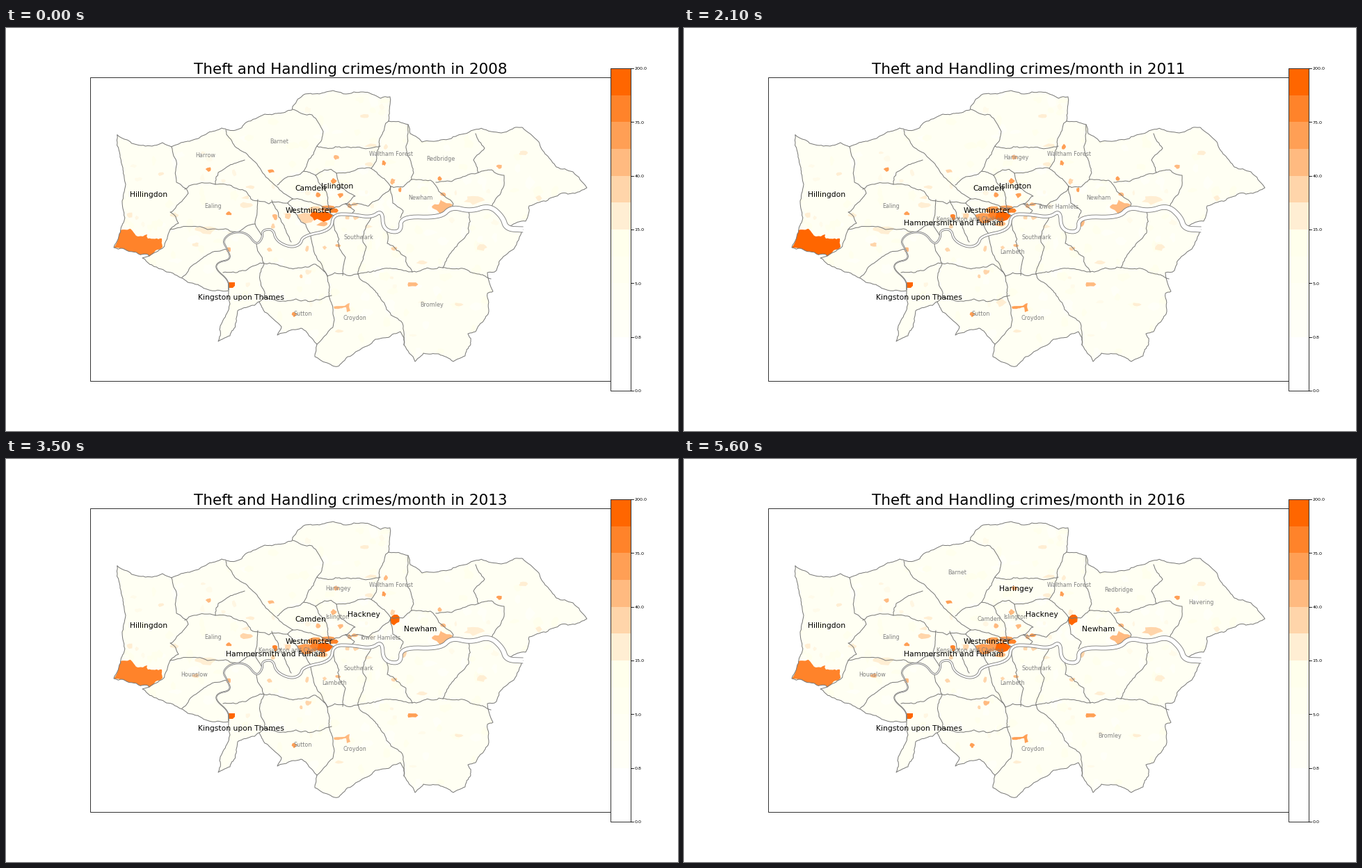
A matplotlib script for the animation above (6300 ms loop, 966 by 580 pixels).

```python
import numpy as np
import matplotlib.pyplot as plt
from matplotlib.animation import FuncAnimation
from matplotlib.collections import PolyCollection
from matplotlib.patches import Polygon, Rectangle

W, H, DPI = 966, 580, 100
PX = 72 / DPI
FIRST, N = 2008, 9
RAMP = ["#ffffff", "#ffffff", "#fffff7", "#fffff4", "#fffff0", "#ffffec",
        "#ffeed3", "#ffd5aa", "#ffba80", "#ff9f55", "#ff832a", "#ff6600"]
GREY = "#787878"

plt.rcParams["font.family"] = "DejaVu Sans"
rng = np.random.default_rng(12)
fig = plt.figure(figsize=(W / DPI, H / DPI), dpi=DPI, facecolor="white")
ax = fig.add_axes([0, 0, 1, 1])
ax.set_xlim(0, W)
ax.set_ylim(H, 0)
ax.axis("off")


def points(*nums):
    return np.array(nums, float).reshape(-1, 2)


def split(a, b, k):
    """Midpoint displacement from a to b, without a itself."""
    d = b - a
    if np.hypot(*d) < 4:
        return [b]
    m = (a + b) / 2 + np.array([-d[1], d[0]]) * rng.normal(0, k)
    return split(a, m, k) + split(m, b, k)


def rough(pts, k=0.07):
    out = [pts[0]]
    for a, b in zip(pts[:-1], pts[1:]):
        out += split(a, b, k)
    return np.array(out)


def smooth(pts, rounds=3):
    for _ in range(rounds):
        a, b = pts[:-1], pts[1:]
        mid = np.stack([0.75 * a + 0.25 * b, 0.25 * a + 0.75 * b], 1)
        pts = np.vstack([pts[:1], mid.reshape(-1, 2), pts[-1:]])
    return pts


def blob(x, y, w, h):
    n = int(rng.integers(7, 12))
    ang = np.linspace(0, 2 * np.pi, n, endpoint=False)
    r = rng.uniform(0.6, 1.2, n) / 2
    return np.c_[x + w * r * np.cos(ang), y + h * r * np.sin(ang)]


def stroke(pts, z=4, width=1.0):
    ax.plot(pts[:, 0], pts[:, 1], color=GREY, lw=width * PX, zorder=z)


def border(*nums):
    stroke(rough(points(*nums)))


# Outer edge, clockwise from the north-west corner
north = points(
    160, 154, 188, 168, 213, 169, 225, 165, 238, 171, 272, 160, 310, 144,
    330, 147, 345, 136, 372, 124, 411, 118, 412, 113, 430, 95, 470, 90,
    500, 92, 552, 99, 550, 134, 578, 139, 581, 152, 598, 164, 625, 161,
    655, 153, 712, 151, 742, 143, 766, 164, 791, 200, 815, 207, 835, 230,
    798, 238, 752, 256, 747, 278, 724, 285, 743, 290)
south = points(
    737, 305, 718, 327, 705, 349, 692, 352, 700, 379, 692, 382, 694, 408,
    675, 437, 664, 440, 668, 455, 643, 480, 622, 469, 600, 468, 588, 480,
    572, 456, 567, 437, 531, 448, 505, 465, 477, 487, 444, 473, 447, 455,
    424, 432, 390, 442, 396, 430, 372, 409, 364, 394, 333, 407, 322, 443,
    305, 451, 307, 434, 322, 397, 320, 378, 289, 376, 253, 360, 196, 331,
    206, 328, 155, 316, 169, 280, 172, 225, 164, 183, 160, 154)
edge = rough(np.vstack([north, south]), 0.06)
land = ax.add_patch(Polygon(edge, fc="#fffff3", ec="none", zorder=1))
stroke(edge)

# Faint variation between small areas
for tint, count, size in [("#fffff8", 90, 16), ("#ffffed", 150, 14),
                          ("#fffbea", 35, 9), ("#fff6e2", 20, 7)]:
    for _ in range(count):
        x, y = rng.uniform(155, 835), rng.uniform(90, 485)
        w, h = size * rng.uniform(0.5, 1.3, 2)
        p = ax.add_patch(Polygon(blob(x, y, w, h), fc=tint, zorder=2))
        p.set_clip_path(land)

# Borough borders, north of the river
border(238, 171, 245, 222, 262, 238, 236, 265, 248, 281, 236, 290, 225, 317,
       206, 328)
border(257, 232, 270, 225, 301, 225, 305, 208, 343, 190)
border(316, 147, 347, 182, 367, 205, 412, 246)
border(301, 225, 345, 235, 352, 246, 405, 252, 412, 246)
border(236, 290, 275, 286, 305, 290, 358, 282)
border(362, 247, 358, 282, 367, 298)
border(382, 248, 392, 272, 410, 308)
border(405, 252, 420, 273, 437, 295)
border(412, 117, 440, 125, 456, 149, 447, 170, 434, 192, 428, 206)
border(447, 170, 490, 171, 538, 170)
border(390, 226, 405, 214, 428, 206, 445, 212, 458, 204, 475, 209, 525, 202)
border(550, 134, 536, 172, 525, 202, 553, 228)
border(578, 139, 575, 170, 585, 205, 583, 218)
border(553, 228, 583, 218, 610, 219, 622, 235, 643, 253, 640, 260)
border(675, 152, 688, 173, 672, 190, 679, 208, 640, 221, 618, 222)
border(679, 208, 716, 212, 710, 240, 697, 262)
border(412, 246, 438, 250, 470, 260, 488, 253, 501, 263, 497, 269)
border(445, 212, 460, 235, 471, 270)
border(475, 209, 482, 230, 502, 242, 488, 253)
border(488, 253, 548, 236, 553, 228, 556, 252, 571, 263, 567, 273)

# Borough borders, south of the river
border(318, 319, 290, 326, 270, 340, 253, 359)
border(360, 309, 370, 338, 365, 355, 372, 386, 364, 394)
border(312, 352, 335, 350, 370, 338, 405, 345, 445, 340, 462, 357)
border(437, 296, 440, 310, 462, 357, 506, 354)
border(471, 277, 488, 330, 484, 356)
border(525, 272, 513, 300, 518, 315, 506, 354)
border(545, 286, 548, 310, 575, 330, 584, 351)
border(665, 262, 665, 295, 633, 335, 628, 345)
border(506, 354, 584, 351, 628, 345, 697, 361)
border(372, 387, 432, 392, 468, 385)
border(462, 357, 472, 420, 447, 455)
border(506, 354, 535, 385, 570, 425, 572, 456)

# River, widening downstream
flow = smooth(points(
    320, 377, 320, 363, 301, 347, 304, 337, 324, 333, 318, 318, 311, 306,
    324, 294, 346, 294, 360, 313, 369, 302, 368, 291, 384, 289, 388, 306,
    408, 316, 423, 312, 427, 299, 468, 291, 470, 268, 497, 268, 525, 273,
    541, 262, 542, 291, 568, 295, 567, 271, 625, 273, 640, 257, 668, 264,
    695, 255, 714, 272, 719, 289, 743, 290))
run = np.gradient(flow, axis=0)
run /= np.hypot(run[:, 0], run[:, 1])[:, None]
half = np.linspace(0.6, 2, len(flow)) ** 2
side = np.c_[-run[:, 1], run[:, 0]] * half[:, None]
banks = flow + side, flow - side
ax.add_patch(Polygon(np.vstack([banks[0], banks[1][::-1]]), fc="white",
                     ec="none", zorder=5))
for bank in banks:
    stroke(bank, 5, 0.85)

# Hot areas: one level per year, 0 = none, 6 = most
shapes, levels = [], []


def area(shape, by_year):
    shapes.append(shape)
    levels.append(by_year)


def trend(a, b):
    return np.linspace(a, b, N).round().astype(int)


airport = rough(points(163, 292, 179, 289, 190, 300, 203, 297, 204, 303,
                       224, 303, 225, 315, 207, 328, 155, 316, 163, 292))
docks = rough(points(612, 257, 622, 254, 625, 247, 642, 254, 634, 264,
                     627, 270, 619, 262, 612, 257))
area(airport, [5, 6, 5, 6, 6, 5, 6, 5, 5])
area(docks, [3] * 6 + [4] + [3] * 2)

# City centre
area(blob(431, 273, 24, 16), [2] + [4] * 8)
area(blob(442, 261, 20, 10), [2] + [4] * 8)
area(blob(456, 282, 18, 9), trend(3, 3))
area(blob(462, 259, 22, 9), trend(4, 4))
area(blob(446, 270, 18, 14), trend(6, 4))
area(blob(459, 270, 22, 18), trend(6, 6))
area(blob(471, 263, 12, 8), trend(5, 5))

# Town centres
area(points(319, 366, 329, 366, 329, 371, 326, 374, 320, 374), trend(6, 6))
area(blob(559, 231, 17, 15), [0] * 4 + [6] * 5)
area(blob(566, 233, 5, 8), [4] * 4 + [0] * 5)
area(blob(572, 280, 11, 17), [0] + [3] * 4 + [2] * 4)
area(blob(526, 169, 21, 6), [1] * 6 + [4] + [1] * 2)
area(blob(387, 272, 9, 9), [3] + [5] * 8)
area(rough(points(471, 401, 484, 400, 494, 396, 495, 407, 490, 409, 489, 402,
                  472, 404, 471, 401)), [3] + [4] * 4 + [3, 2, 4, 4])
area(blob(584, 369, 15, 8), trend(3, 4))
area(blob(346, 255, 18, 9), trend(1, 2))
area(blob(381, 206, 12, 5), [4, 4, 3, 2, 2, 3, 3, 4, 4])
area(blob(546, 171, 7, 8), [1] * 3 + [4] * 2 + [3] * 2 + [1] * 2)
area(blob(456, 395, 18, 13), [0] * 3 + [1] * 2 + [0] * 4)

centres = {
    (4, 3): [(291, 203), (623, 217), (449, 240), (481, 241), (471, 220)],
    (4, 4): [(320, 267), (543, 194), (414, 412)],
    (3, 3): [(320, 319), (494, 256), (629, 239), (475, 186), (477, 313)],
    (3, 4): [(709, 199)],
    (2, 4): [(501, 254)],
    (1, 3): [(273, 312), (435, 351)],
    (3, 1): [(556, 221)],
    (2, 2): [(384, 285), (405, 270), (458, 316), (433, 318), (379, 319),
             (557, 317), (490, 273), (503, 273), (424, 357)],
}
for (a, b), places in centres.items():
    for x, y in places:
        area(blob(x, y, *rng.uniform(6, 10, 2)), trend(a, b))

# Wider, mild areas
area(blob(288, 291, 34, 11), trend(1, 1))
area(blob(673, 248, 27, 13), [1] * 8 + [2])
for x, y in [(222, 210), (178, 269), (241, 269), (352, 229), (345, 244),
             (516, 127), (744, 180), (766, 245), (684, 316), (598, 337),
             (650, 398), (479, 436), (523, 196), (521, 286)]:
    area(blob(x, y, rng.uniform(9, 16), rng.uniform(5, 9)), trend(1, 1))

cells = PolyCollection(shapes, edgecolors="none", zorder=3)
ax.add_collection(cells)
cells.set_clip_path(land)

# Plot frame and colour scale
x0, x1, top, bottom = 0.9 * W, 0.93 * W, 0.1 * H, 0.9 * H
ax.add_patch(Rectangle((0.125 * W, 71), 0.775 * W, 437, fill=False,
                       ec="#333333", lw=PX, zorder=6))
band = (bottom - top) / len(RAMP)
for i, c in enumerate(RAMP):
    ax.add_patch(Rectangle((x0, bottom - (i + 1) * band), x1 - x0, band, fc=c,
                           ec="none", antialiased=False, zorder=6))
ax.add_patch(Rectangle((x0, top), x1 - x0, bottom - top, fill=False,
                       ec="#333333", lw=PX, zorder=7))


def text(x, y, s, size, color="black", ha="center", z=8):
    """Text of a size in pixels, its capitals centred on y."""
    return ax.text(x, y + 0.365 * size, s, fontsize=size * PX, color=color,
                   ha=ha, va="baseline", zorder=z)


for i, s in enumerate(["0.0", "0.8", "5.0", "15.0", "40.0", "75.0", "200.0"]):
    y = bottom - 2 * band * i
    ax.plot([x1, x1 + 3.7], [y, y], color="black", lw=0.6, zorder=7)
    text(903.6, y, s, 6.44, ha="left")

title = text(495.07, 58, "", 21.47)

# Names: s = small grey, B = large black, one letter per year
labels = []


def label(name, x, y, code):
    small = text(x, y, name, 8.05, "#808080")
    large = text(x, y, name, 10.73, z=9)
    labels.append((small, large, code))


label("Hillingdon", 205, 239, "BBBBBBBBB")
label("Westminster", 435.5, 262, "BBBBBBBBB")
label("Kingston upon Thames", 338, 387, "BBBBBBBBB")
label("Camden", 438, 230, "BBBBBBsss")
label("Islington", 476, 227.5, "BBBBsssss")
label("Hammersmith and Fulham", 388, 280.5, ".BBBBBBBB")
label("Hackney", 514, 223, "....BBBBB")
label("Newham", 595.5, 244.5, "ssssBBBBB")
label("Haringey", 477, 186.5, ".sssssssB")
label("Barnet", 392.5, 163, "ss.....ss")
label("Harrow", 287, 183, "s........")
label("Waltham Forest", 553, 181.5, "ssssss.ss")
label("Redbridge", 624.5, 188, "ss......s")
label("Ealing", 297.5, 256.5, "sssssssss")
label("Southwark", 507, 301.5, "ssssss..s")
label("Bromley", 612.5, 398, "s.....sss")
label("Sutton", 427, 411.5, "sssssss..")
label("Croydon", 501, 417, "ssssss.ss")
label("Tower Hamlets", 537.5, 257, ".sssss...")
label("Kensington and Chelsea", 411, 275, "..sssssss")
label("Lambeth", 472, 322, "..sssssss")
label("Barking and Dagenham", 673, 227, "....s....")
label("Hounslow", 270.5, 310, "....sssss")
label("Greenwich", 613, 299.5, "....s....")
label("Enfield", 491, 127, "......s..")
label("Havering", 743, 206, "........s")


def draw(i):
    title.set_text(f"Theft and Handling crimes/month in {FIRST + i}")
    cells.set_facecolor([RAMP[5 + v[i]] if v[i] else "none" for v in levels])
    for small, large, code in labels:
        small.set_visible(code[i] == "s")
        large.set_visible(code[i] == "B")
    return [title, cells]


anim = FuncAnimation(fig, draw, frames=N, interval=700, repeat=True)
plt.show()
```
